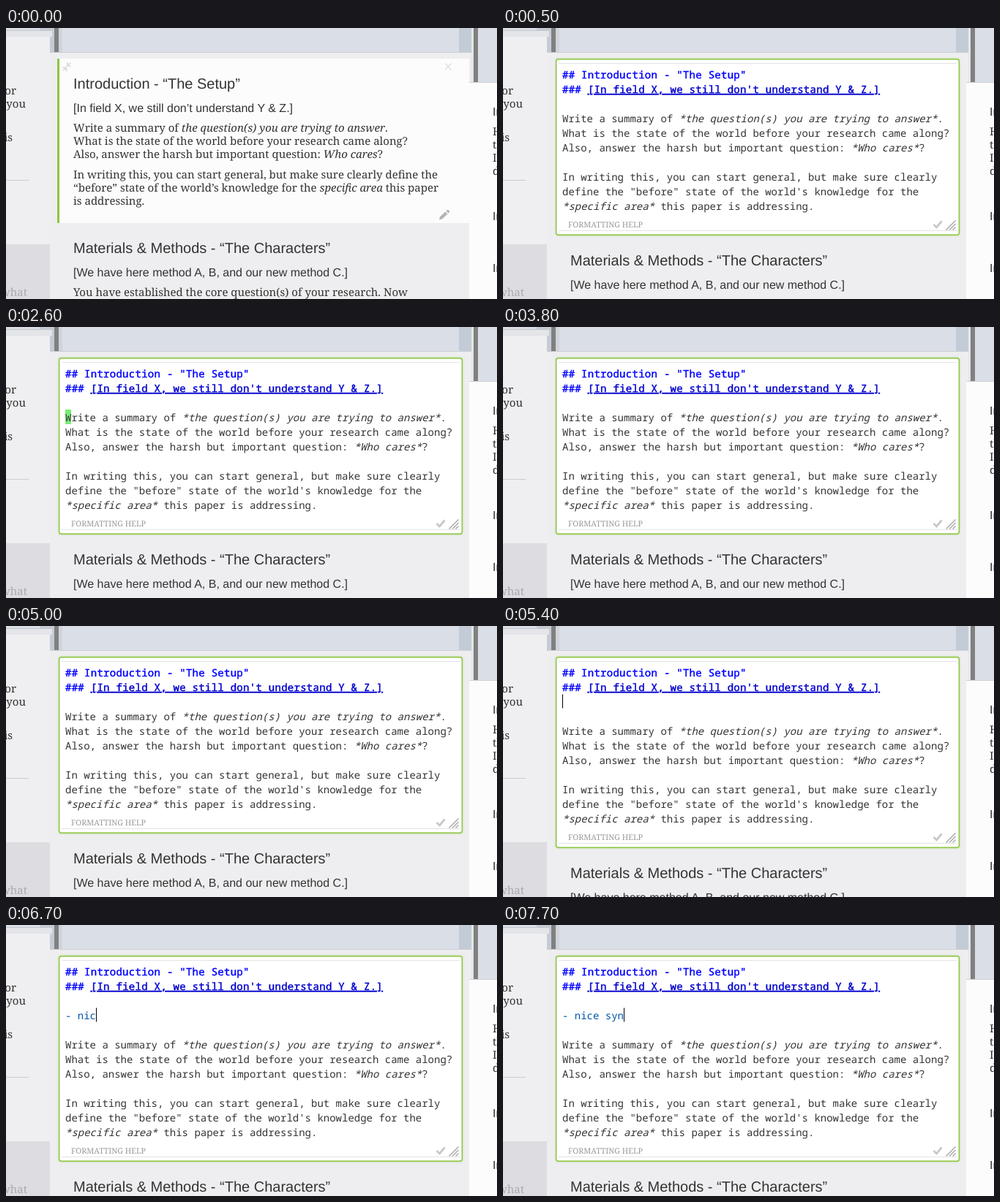
An HTML page that plays this animation: 671x371 px, repeating every 8 s.

```html
<!DOCTYPE html>
<html lang="en">
<head>
<meta charset="utf-8">
<title>Card editor</title>
<style>
  html, body { margin: 0; width: 100%; height: 100%; overflow: hidden; background: #eeeef0; }
  svg { display: block; width: 671px; height: 371px; }
  text { white-space: pre; text-rendering: geometricPrecision; fill: #333; }
  .h2 { font: 20px "Liberation Sans", Arial, sans-serif; }
  .h3 { font: 16px "Liberation Sans", Arial, sans-serif; }
  .p { font: 15px "Noto Serif", serif; }
  .help { font: 10.7px "Noto Serif", serif; fill: #999; }
  .code { font: 14px "Noto Sans Mono", monospace; fill: #000; }
  .head { fill: #00f; stroke: #00f; stroke-width: .45px; letter-spacing: .28px; }
  .link { fill: #00c; stroke: #00c; text-decoration: underline; }
  .list { fill: #05a; }
  .em { font-style: italic; }
  .end { text-anchor: end; }
  #frame { fill: #fff; stroke: #8bc53f; stroke-width: 1.4; filter: drop-shadow(0 0 1.5px rgba(139, 197, 63, .6)); }
</style>
</head>
<body>
<svg viewBox="0 0 671 371">
  <!-- backdrop and neighbouring columns -->
  <rect width="671" height="371" fill="#eeeef0"/>
  <rect width="671" height="33" fill="#dadfe7"/>
  <rect x="46" width="20" height="33" fill="#c3ccd6"/>
  <rect x="66" width="6" height="33" fill="#808080"/>
  <rect x="72" width="5" height="33" fill="#d0d3d8"/>
  <rect x="619" width="17" height="34" fill="#c3ccd6"/>
  <rect x="60" y="33" width="576" height="1" fill="#cfcfd3"/>
  <rect y="3" width="63" height="9" fill="#e4e5e9"/>
  <rect y="3" width="63" height="1" fill="#c4c6ca"/>
  <rect y="12" width="60" height="359" fill="#efeff1"/>
  <rect y="208" width="31" height="1" fill="#cbcbcf"/>
  <rect y="296" width="60" height="75" fill="#dddde1"/>
  <rect x="636" width="3" height="74" fill="#e4e6ea"/>
  <rect x="639" width="6" height="74" fill="#808080"/>
  <rect x="645" width="26" height="74" fill="#dadfe7"/>
  <rect x="633" y="74" width="38" height="297" fill="#fcfcfc"/>
  <rect x="633" y="74" width="38" height="1" fill="#cfcfd3"/>
  <g class="p end">
    <text x="14" y="91">or</text>
    <text x="27" y="109">you</text>
    <text x="9" y="155">is</text>
    <text x="29" y="367" style="fill:#aaaaae">what</text>
  </g>
  <g class="h3">
    <text x="665" y="120">In</text>
    <text x="665" y="263">In</text>
    <text x="665" y="334">In</text>
  </g>
  <g class="p">
    <text x="665" y="147">He</text>
    <text x="665" y="165">th</text>
    <text x="665" y="183">In</text>
    <text x="665" y="201">de</text>
  </g>

  <!-- following card -->
  <g id="next">
    <text class="h2" x="92" y="308">Materials &amp; Methods - “The Characters”</text>
    <text class="h3" x="92" y="340">[We have here method A, B, and our new method C.]</text>
    <text class="p" x="92" y="367">You have established the core question(s) of your research. Now</text>
  </g>

  <!-- rendered card -->
  <g id="view">
    <rect x="70" y="42" width="563" height="225" fill="#fcfcfc"/>
    <rect x="70" y="42" width="3" height="225" fill="#8cc63f"/>
    <path d="M77.5 58.5l4-4M78.5 54h4v4zM88.5 47.5l-4 4M87.5 52h-4v-4z" stroke="#ddd" stroke-width="1.6" fill="#ddd"/>
    <path d="M600 48.5l8.500 8.500M608.500 48.500l-8.500 8.500" stroke="#ddd" stroke-width="1.300"/>
    <path d="M592 262.500l1-4 7.500-7 3 3-7.500 7zM601.500 250.500l1.500-1.500h1.500l1.500 1.500v1.500l-1.500 1.500z" fill="#b4b4b4"/>
    <text class="h2" x="92" y="83">Introduction - “The Setup”</text>
    <text class="h3" x="92" y="115">[In field X, we still don’t understand Y &amp; Z.]</text>
    <g class="p">
      <text x="92" y="142">Write a summary of <tspan class="em">the question(s) you are trying to answer</tspan>.</text>
      <text x="92" y="160">What is the state of the world before your research came along?</text>
      <text x="92" y="178">Also, answer the harsh but important question: <tspan class="em">Who cares</tspan>?</text>
      <text x="92" y="206">In writing this, you can start general, but make sure clearly define the</text>
      <text x="92" y="224">“before” state of the world’s knowledge for the <tspan class="em">specific area</tspan> this paper</text>
      <text x="92" y="242">is addressing.</text>
    </g>
  </g>

  <!-- source editor -->
  <g id="edit">
    <rect id="frame" x="72.700" y="42.700" width="550.600" height="240.600" rx="3"/>
    <path d="M76 48.500H620" stroke="#e3e3e3"/>
    <g id="foot">
      <path d="M76 277.500H620" stroke="#e3e3e3"/>
      <text class="help" x="89" y="273">FORMATTING HELP</text>
      <path d="M588.500 269l4 4 7-8.500" fill="none" stroke="#c8c8c8" stroke-width="2.800"/>
      <path d="M605.500 276.500l13-13M610 276.500l8.500-8.500M614.500 276.500l4-4" stroke="#aaa" stroke-width="1.500"/>
    </g>
    <rect id="block" height="20" fill="#77ee77"/>
    <g class="code">
      <text class="head" x="81" y="69">## Introduction - "The Setup"</text>
      <text class="head" x="81" y="89">### <tspan class="link">[In field X, we still don't understand Y &amp; Z.]</tspan></text>
      <text class="list" id="typed" x="81" y="129"></text>
      <g id="body">
        <text x="81" y="129">Write a summary of <tspan class="em">*the question(s) you are trying to answer*</tspan>.</text>
        <text x="81" y="149">What is the state of the world before your research came along?</text>
        <text x="81" y="169">Also, answer the harsh but important question: <tspan class="em">*Who cares*</tspan>?</text>
        <text x="81" y="209">In writing this, you can start general, but make sure clearly</text>
        <text x="81" y="229">define the "before" state of the world's knowledge for the</text>
        <text x="81" y="249"><tspan class="em">*specific area*</tspan> this paper is addressing.</text>
      </g>
    </g>
    <rect id="bar" width="1" height="19" fill="#000"/>
  </g>
</svg>
<script>
  const LOOP = 8000, LEFT = 81, TOP = 53, ROW = 20, COL = 8.4;
  const NOTE = "- nice syn";
  const LINE_END = 515;

  // [time, cursor kind, row, x]
  const cursor = [
    [0, "none"],
    [1300, "block", 10], [1700, "block", 7], [1900, "block", 6], [2100, "block", 5],
    [2400, "block", 4], [2600, "block", 3], [2900, "block", 2], [3200, "block", 1],
    [3800, "none"],
    [4100, "block", 1, LINE_END - 9], [4500, "bar", 1, LINE_END],
    [5000, "none"],
    [5400, "bar", 2], [5600, "bar", 3]
  ];
  const newlines = [5400, 5600];
  const keys = [6200, 6300, 6500, 6600, 6700, 6900, 7000, 7400, 7600, 7700];

  const $ = id => document.getElementById(id);
  const passed = (times, t) => times.filter(at => at <= t).length;
  const show = (id, on) => $(id).setAttribute("visibility", on ? "inherit" : "hidden");
  const shift = (id, y) => $(id).setAttribute("transform", `translate(0 ${y})`);
  const set = (id, attrs) => {
    for (const name in attrs) $(id).setAttribute(name, attrs[name]);
  };

  function draw(t) {
    const open = t >= 500;
    const grow = ROW * passed(newlines, t);
    const typed = passed(keys, t);
    const [, kind, row = 0, x = LEFT] = cursor.filter(step => step[0] <= t).pop();

    show("view", !open);
    show("edit", open);
    shift("next", open ? 17 + grow : 0);
    shift("foot", grow);
    shift("body", grow);
    set("frame", { height: 240.6 + grow });
    $("typed").textContent = NOTE.slice(0, typed);

    const y = TOP + ROW * row;
    show("block", open && kind === "block");
    show("bar", open && kind === "bar");
    set("block", { x, y, width: x > LEFT ? 9 : 8 });
    set("bar", { x: Math.round(x + typed * COL), y: y + .5 });
  }

  const start = performance.now();
  function tick() {
    draw((performance.now() - start) % LOOP);
    requestAnimationFrame(tick);
  }
  tick();
</script>
</body>
</html>
```
